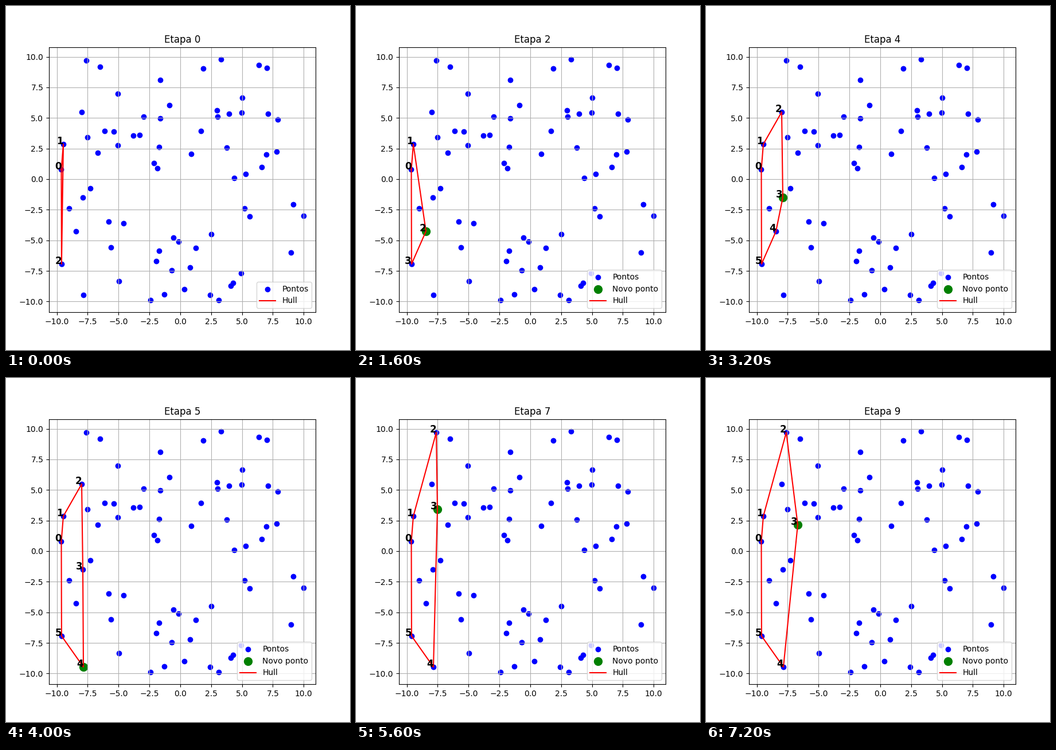
Write a matplotlib script that moves like this. It is 600 px wide and 600 px high and loops after 8000 ms.

```python
import numpy as np
import matplotlib.pyplot as plt
from matplotlib.animation import FuncAnimation

STEPS = 10
STEP_MS = 800
XLIM = (-10.627, 10.961)
YLIM = (-10.867, 10.773)
BOX = (75, 540, 534, 72)  # axes left, right, bottom, top in pixels

# Point cloud in stage pixels, ordered by x
PIXELS = np.array([
    (96.5, 285), (96.9, 450), (100, 241), (110, 353), (122, 393), (132, 185),
    (134, 334), (135, 504), (140, 95), (142, 229), (147, 318), (160, 256),
    (164, 106), (172, 218), (179, 376), (183, 421), (188, 219), (195, 153),
    (195, 243), (197, 480), (205, 379), (222, 226), (233, 225), (240, 193),
    (252, 513), (258, 274), (262, 445), (264, 283), (267, 246), (267, 427),
    (269, 129), (269, 196), (276, 503), (285, 173), (289, 461), (292, 404),
    (301, 411), (311, 494), (321, 456), (323, 258), (331, 422), (340, 218),
    (344, 109), (356, 504), (358, 398), (368, 182), (369, 193), (371, 513),
    (375, 93), (385, 247), (389, 188), (392, 488), (396, 483), (398, 300),
    (410, 466), (411, 186), (412, 160), (416, 353), (418, 293), (425, 367),
    (441, 103), (446, 281), (454, 259), (455, 108), (457, 188), (472, 254),
    (474, 198), (497, 430), (501, 346), (518.6, 366),
])


def to_data(pixels):
    left, right, bottom, top = BOX
    x = np.interp(pixels[:, 0], (left, right), XLIM)
    y = np.interp(pixels[:, 1], (top, bottom), YLIM[::-1])
    return np.column_stack([x, y])


def half_hull(pts):
    """Chain of clockwise turns through points sorted along x."""
    chain = []
    for p in pts:
        while len(chain) > 1:
            a, b = chain[-2], chain[-1]
            if (b[0] - a[0]) * (p[1] - a[1]) < (b[1] - a[1]) * (p[0] - a[0]):
                break
            chain.pop()
        chain.append(p)
    return chain


def convex_hull(pts):
    """Clockwise hull starting at the leftmost point."""
    return np.array(half_hull(pts)[:-1] + half_hull(pts[::-1])[:-1])


points = to_data(PIXELS)
fig, ax = plt.subplots(figsize=(6, 6), dpi=100)


def draw(step):
    ax.clear()
    used = points[:step + 3]
    hull = convex_hull(used)
    closed = np.vstack([hull, hull[:1]])

    ax.scatter(*points.T, color="blue", label="Pontos")
    if step:
        ax.scatter(*used[-1], color="green", s=100, label="Novo ponto")
    ax.plot(*closed.T, color="red", label="Hull")
    for i, (x, y) in enumerate(hull):
        ax.text(x, y, str(i), fontsize=12, fontweight="bold", ha="right")

    ax.set(xlim=XLIM, ylim=YLIM, title=f"Etapa {step}")
    ax.grid(True)
    ax.legend(loc="lower right")


anim = FuncAnimation(fig, draw, frames=STEPS, init_func=lambda: draw(0),
                     interval=STEP_MS, repeat=True, repeat_delay=0)
plt.show()
```
